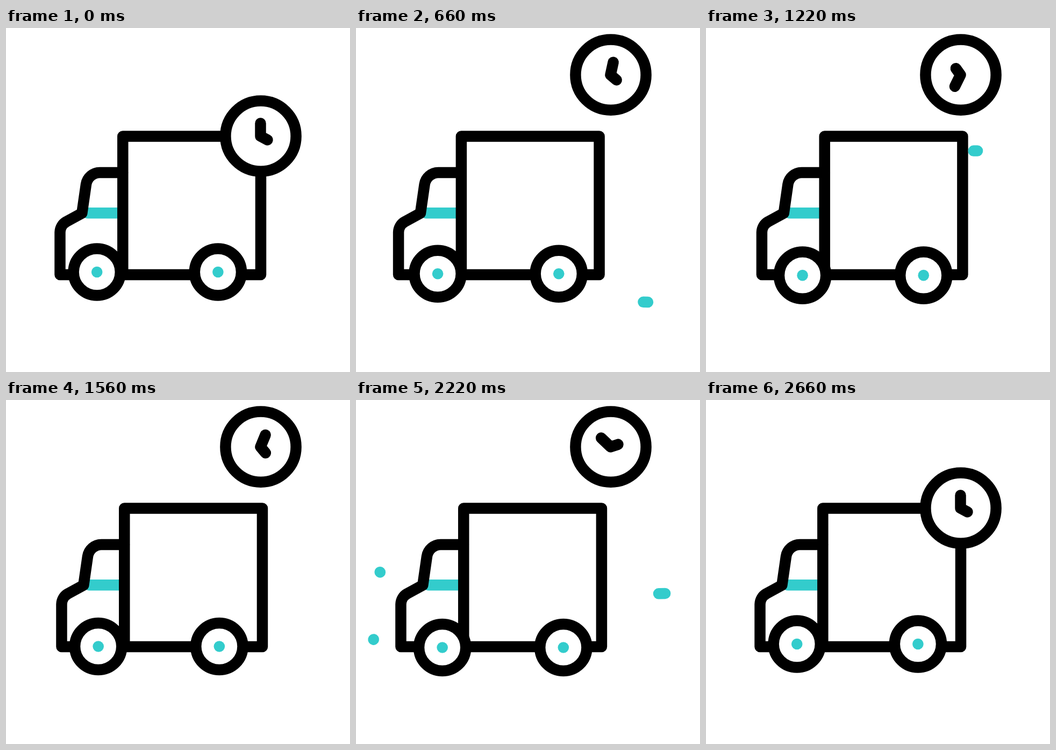
Recreate the animation shown at these times as an HTML page with a canvas. Size 640 px wide and 640 px high, loop 2.76 s.

```html
<!DOCTYPE html>
<html lang="en">
<head>
<meta charset="utf-8">
<title>Delivery truck</title>
<style>
html, body { margin: 0; height: 100%; overflow: hidden; background: #fff; }
canvas { display: block; width: 100vw; height: 100vh; }
</style>
</head>
<body>
<canvas id="stage" width="640" height="640"></canvas>
<script>
const ctx = document.getElementById('stage').getContext('2d');
const LOOP = 2760, BLACK = '#000', TEAL = '#33cccc', WIDTH = 20.5;
const cab = new Path2D('M217 269H174.5A26 26 0 0 0 149 291L141.3 344.5L112 360.5A23 23 0 0 0 100.5 380V459H217');

const ease = (t, start, end) => {
  const u = Math.min(1, Math.max(0, (t - start) / (end - start)));
  return u * u * (3 - 2 * u);
};

function line(color, ...points) {
  ctx.strokeStyle = color;
  ctx.beginPath();
  points.forEach(([x, y]) => ctx.lineTo(x, y));
  ctx.stroke();
}

function disc(x, y, r, fill, stroke) {
  ctx.beginPath();
  ctx.arc(x, y, r, 0, 2 * Math.PI);
  ctx.fillStyle = fill;
  ctx.fill();
  if (!stroke) return;
  ctx.strokeStyle = stroke;
  ctx.stroke();
}

function drawTruck(t) {
  const forward = ease(t, 220, 640) - ease(t, 2040, 2660);
  const back = ease(t, 640, 1280) - ease(t, 1500, 2006);
  const lag = ease(t, 420, 900) - ease(t, 2220, 2660);
  const recoil = ease(t, 1100, 1560) - ease(t, 1600, 2140);

  ctx.save();
  ctx.translate(25.5 * back - 21.5 * forward, 0);
  line(TEAL, [152, 344.3], [215, 344.3]);
  ctx.strokeStyle = BLACK;
  ctx.stroke(cab);
  ctx.strokeRect(217.3, 201.5, 256.7, 257.5);

  ctx.translate(8.5 * lag - 9 * recoil, 6.5 * lag - 2 * recoil);
  for (const x of [169.2, 394.4]) {
    disc(x, 454, 43.6, '#fff', BLACK);
    disc(x, 454, 10.3, TEAL);
  }
  ctx.restore();
}

function drawClock(t) {
  const lift = ease(t, 100, 553) - ease(t, 2240, 2660);
  ctx.save();
  ctx.translate(474, 201.2 - 114 * lift);
  disc(0, 0, 65.6, '#fff', BLACK);
  ctx.translate(-0.5, 0);
  ctx.rotate(4 * Math.PI * ease(t, 503, 2535));
  line(BLACK, [0, -24], [0, 0], [13, 7]);
  ctx.restore();
}

// A stroke that shoots from one point to another, its tail following later
function drawStreak(t, [x1, y1], [x2, y2], start, duration, delay) {
  if (t <= start || t >= start + duration + delay) return;
  const at = u => [x1 + (x2 - x1) * u, y1 + (y2 - y1) * u];
  const head = ease(t, start, start + duration);
  const tail = ease(t, start + delay, start + delay + duration);
  line(TEAL, at(tail), at(head + 0.001));
}

function drawSpeedLines(t) {
  const shoot = (x1, x2, y, tilt, start, delay) =>
    drawStreak(t, [x1, y], [x2, y + tilt], start, 400, delay);
  shoot(496, 543, 509, 1, 170, 200);
  shoot(453, 505, 229, -0.5, 715, 200);
  shoot(474, 618, 308.7, 2.3, 1580, 218);
  shoot(384, 575, 364, -4, 1756, 126);
}

function drawHeadlight(t) {
  [46, 4, -35].forEach((degrees, i) => {
    const middle = i === 1, angle = degrees * Math.PI / 180;
    const at = r => [112 - r * Math.cos(angle), 390 - r * Math.sin(angle)];
    drawStreak(t, at(middle ? 49 : 66), at(middle ? 92 : 97), middle ? 1720 : 1790, 320, 130);
  });
}

function draw(t) {
  ctx.fillStyle = '#fff';
  ctx.fillRect(0, 0, 640, 640);
  ctx.lineWidth = WIDTH;
  ctx.lineCap = ctx.lineJoin = 'round';
  drawTruck(t);
  drawClock(t);
  drawSpeedLines(t);
  drawHeadlight(t);
}

function frame() {
  draw(performance.now() % LOOP);
  requestAnimationFrame(frame);
}
frame();
</script>
</body>
</html>
```
